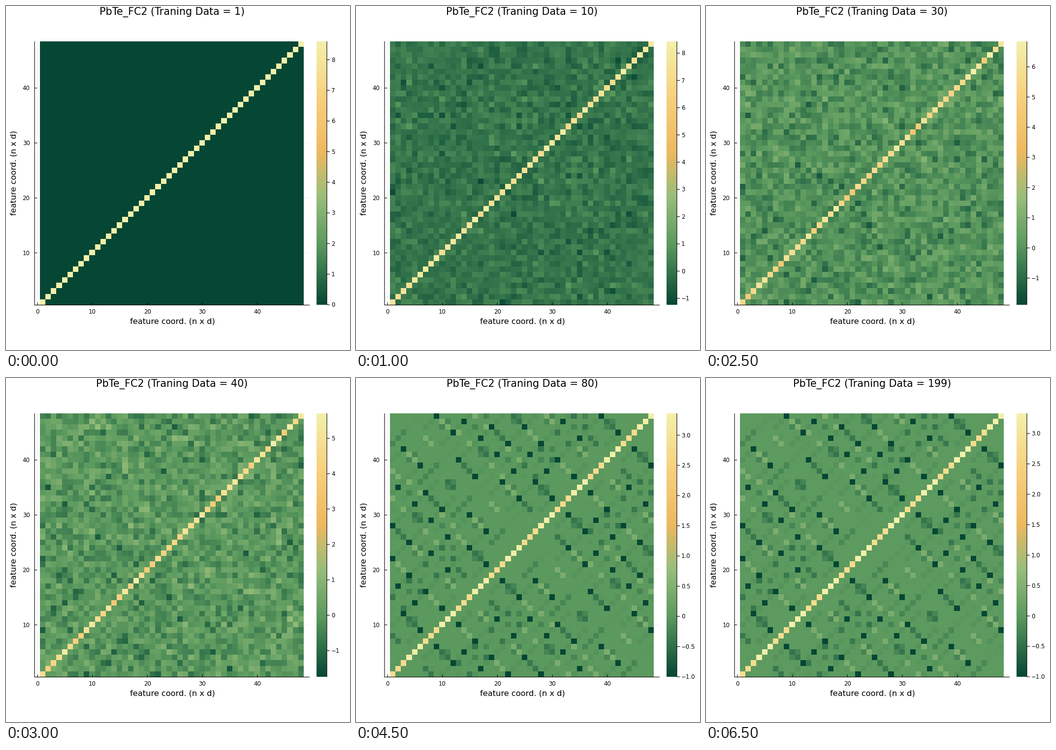
Write a matplotlib script that moves like this. It is 699 by 700 pixels and loops after 7000 ms.

```python
import numpy as np
import matplotlib.pyplot as plt
from matplotlib.animation import FuncAnimation
from matplotlib.colors import LinearSegmentedColormap

W, H, DPI = 699, 700, 100
CELLS, ATOMS = 48, 16
PRIOR = 8.6          # stiffness assumed before any training
SIZES = [1, 5, 10, 15, 20, 30, 40, 50, 60, 80, 100, 120, 150, 199]

CMAP = LinearSegmentedColormap.from_list("fields", [
    (0, "#054734"), (.23, "#5c9a5f"), (.41, "#98be7b"),
    (.58, "#eeb95f"), (.8, "#f8d280"), (1, "#f3f0aa")])

LEFT, RIGHT, TOP, BOTTOM = 58, 617, 72, 608
HEAT_L, HEAT_R = 69, 605
BAR_L, BAR_R = 631, 652
SMALL, MEDIUM, LARGE = 8.48, 11.66, 14.84


def coupling(p, q):
    """3x3 block between two atoms; sites form a 2x2x2 lattice."""
    h = (p // 2) ^ (q // 2)
    heavy = p % 2 == 0
    axis = min(h, 7 - h)             # 0, or 1, 2, 3 for z, y, x
    k = 3 - axis
    if p % 2 != q % 2:               # different species
        if axis == 0:
            return 0.02 * np.eye(3)
        block = -0.07 * np.eye(3)
        block[k, k] = -1
        return block
    if h == 0:
        return (2.78 if heavy else 3.32) * np.eye(3)
    if axis == 0:
        return (-0.22 if heavy else -0.02) * np.eye(3)
    near, cross = (-0.03, 0.40) if heavy else (-0.24, 0.43)
    sign = 1 if h in (3, 5, 6) else -1
    block = np.full((3, 3), sign * cross)
    np.fill_diagonal(block, near)
    block[k, :] = block[:, k] = 0
    return block


FORCE = np.block([[coupling(p, q) for q in range(ATOMS)]
                  for p in range(ATOMS)])
BASIS = np.linalg.qr(
    np.random.default_rng(12).normal(size=(CELLS, CELLS)))[0]


def learned(size):
    """Number of directions fixed by this much training data."""
    return min(CELLS, round(0.88 * (size - 1)))


def estimate(rank):
    """Learned directions follow FORCE, the others keep the prior."""
    known = BASIS[:, :rank]
    rest = np.eye(CELLS) - known @ known.T
    return FORCE + rest @ (PRIOR * np.eye(CELLS) - FORCE) @ rest


def limits(size):
    """Colour range: noise widens it, then it settles on FORCE."""
    f = learned(size) / CELLS
    low = -f - 4.5 * f ** 0.7 * (1 - f)
    end = 3.31 + 4 / size
    return low, end + (PRIOR - end) * np.cos(np.pi * f / 2)


plt.rcParams["font.family"] = "DejaVu Sans"
fig = plt.figure(figsize=(W / DPI, H / DPI), dpi=DPI, facecolor="white")
ax = fig.add_axes([0, 0, 1, 1])
ax.axis("off")


def line(xs, ys, width=0.8, zorder=4, **kw):
    return ax.plot(xs, ys, color="black", lw=width, zorder=zorder,
                   solid_capstyle="butt", snap=False, **kw)[0]


def label(x, y, text, size=SMALL, ha="center", va="baseline", **kw):
    return ax.text(x, y, text, fontsize=size, ha=ha, va=va, **kw)


def picture(data, left, right):
    return ax.imshow(data, cmap=CMAP, aspect="auto", zorder=2,
                     interpolation="nearest",
                     extent=(left, right, BOTTOM, TOP))


heat = picture(FORCE[::-1], HEAT_L, HEAT_R)
picture(np.linspace(1, 0, 256)[:, None], BAR_L, BAR_R)
ax.set_xlim(0, W)
ax.set_ylim(H, 0)

line([LEFT, LEFT], [TOP, BOTTOM + 1])
line([LEFT, RIGHT], [BOTTOM + 0.5] * 2)
line([BAR_R, BAR_R], [TOP, BOTTOM])

for v in range(0, 41, 10):
    x = 63.9 + 11.17 * v
    line([x, x], [TOP, BOTTOM], 0.5, 1, alpha=0.1)
    line([x, x], [BOTTOM - 4.5, BOTTOM + 0.5])
    label(x, 626, str(v))
    if v:
        y = 614.2 - 11.18 * v
        line([LEFT, RIGHT], [y, y], 0.5, 1, alpha=0.1)
        line([LEFT, LEFT + 5], [y, y])
        label(48.5, y + 4.3, str(v), ha="right")

label(338, 646.5, "feature coord. (n x d)", MEDIUM)
label(23.7, 340, "feature coord. (n x d)", MEDIUM, "right", "center",
      rotation=90)
title = label(337.5, 18, "", LARGE)

marks = [(line([0, 0], [0, 0]), label(661, 0, "", ha="left"))
         for _ in range(12)]


def tick_text(v, step):
    text = f"{v:.1f}" if step < 1 and v else f"{v:.0f}"
    return text.replace("-", "\u2212")


def draw(i):
    size = SIZES[i]
    low, high = limits(size)
    heat.set_data(estimate(learned(size))[::-1])
    heat.set_clim(low, high)
    title.set_text(f"PbTe_FC2 (Traning Data = {size})")

    step = 1 if high - low > 5 else 0.5
    first = int(np.ceil(low / step - 1e-6))
    for k, (tick, text) in enumerate(marks):
        v = (first + k) * step
        y = BOTTOM - (v - low) / (high - low) * (BOTTOM - TOP)
        tick.set_data([BAR_R, BAR_R + 6], [y, y])
        text.set_y(y + 4.3)
        text.set_text(tick_text(v, step))
        for part in (tick, text):
            part.set_visible(v <= high)
    return [heat, title]


anim = FuncAnimation(fig, draw, frames=len(SIZES), init_func=lambda: draw(0),
                     interval=500, repeat=True, repeat_delay=0, blit=False)
plt.show()
```
